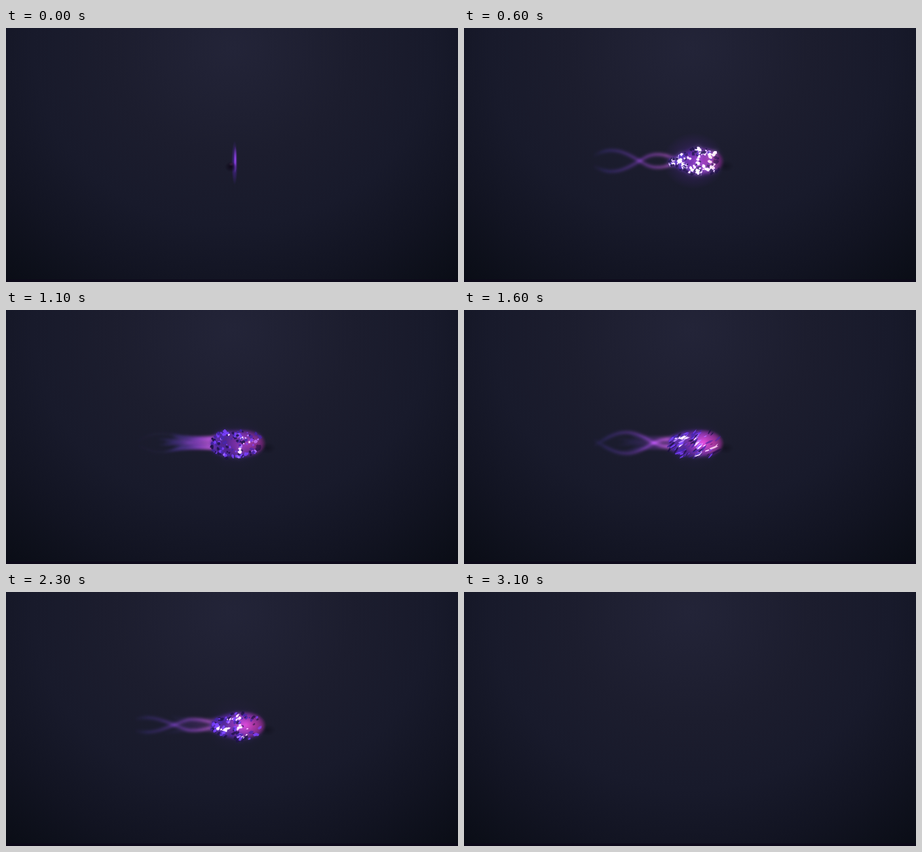
Recreate the animation shown at these times as an HTML page with a canvas. Size 690 by 388 pixels, loop 3500 ms.

```html
<!DOCTYPE html>
<html lang="en">
<head>
<meta charset="utf-8">
<title>Crystal bolt</title>
<style>
html, body { margin: 0; width: 100%; height: 100%; overflow: hidden; background: #10121f; }
canvas { display: block; width: 690px; height: 388px; }
</style>
</head>
<body>
<canvas id="stage" width="690" height="388"></canvas>
<script>
const W = 690, H = 388, LOOP = 3500, STEP = 100;
const MID_Y = 204, BODY_X = 353, HALF_LENGTH = 41;
const ctx = document.getElementById('stage').getContext('2d');

function layer(draw) {
  const canvas = document.createElement('canvas');
  canvas.width = W;
  canvas.height = H;
  if (draw) draw(canvas.getContext('2d'));
  return canvas;
}

const bodyLayer = layer();
const body = bodyLayer.getContext('2d');

const backdrop = layer(g => {
  g.save();
  g.translate(345, 30);
  g.scale(1.12, 1);
  const shade = g.createRadialGradient(0, 0, 0, 0, 0, 470);
  shade.addColorStop(0, 'rgb(35,36,56)');
  shade.addColorStop(.35, 'rgb(28,29,46)');
  shade.addColorStop(.58, 'rgb(24,26,43)');
  shade.addColorStop(.78, 'rgb(18,20,34)');
  shade.addColorStop(1, 'rgb(10,13,22)');
  g.fillStyle = shade;
  g.fillRect(-400, -40, 800, 500);
  g.restore();
  g.fillStyle = 'rgba(14,8,26,.7)';
  g.fillRect(0, 384, W, 4);
});

// step, crossing x, spread, tail, fan, white, pink, halo, streak, left taper
const KEYS = [
  [1, 347, 13, .5, .3, .8, .5, .8, 0, .7],
  [6, 268, 16, .75, 0, 1, .3, .55, 0, 1],
  [11, 194, 14, .08, 1, .35, .45, .1, 0, 0],
  [16, 120, 16, .75, .4, .45, .85, .1, 1, .2],
  [20, 50, 14, .8, .4, .6, .75, .14, .5, .1],
  [27, -63, 7, .55, 0, .42, .8, .1, 0, .9],
  [30, -110, 7, .4, 0, .15, .4, .04, 0, .6]
];

function pose(step) {
  const next = Math.max(1, KEYS.findIndex(k => k[0] >= step));
  const a = KEYS[next - 1], b = KEYS[next];
  const p = (step - a[0]) / (b[0] - a[0]);
  const [, cross, spread, tail, fan, white, pink, halo, streak, taper] =
    a.map((v, i) => v + (b[i] - v) * p);
  return { cross, spread, tail, fan, white, pink, halo, streak, taper };
}

function seeded(seed) {
  let s = seed;
  return () => {
    s = (s + 0x6D2B79F5) | 0;
    let n = Math.imul(s ^ s >>> 15, 1 | s);
    n ^= n + Math.imul(n ^ n >>> 7, 61 | n);
    return ((n ^ n >>> 14) >>> 0) / 4294967296;
  };
}

function glow(g, x, y, rx, ry, rgb, alpha) {
  g.save();
  g.translate(x, y);
  g.scale(rx, ry);
  const fill = g.createRadialGradient(0, 0, 0, 0, 0, 1);
  fill.addColorStop(0, `rgba(${rgb},${alpha})`);
  fill.addColorStop(.5, `rgba(${rgb},${alpha * .5})`);
  fill.addColorStop(1, `rgba(${rgb},0)`);
  g.fillStyle = fill;
  g.fillRect(-1, -1, 2, 2);
  g.restore();
}

function tailColor(left, alpha) {
  const fill = ctx.createLinearGradient(left, 0, 330, 0);
  fill.addColorStop(0, 'rgba(50,30,130,0)');
  fill.addColorStop(.15, `rgba(64,34,150,${alpha * .5})`);
  fill.addColorStop(.55, `rgba(125,42,175,${alpha * .85})`);
  fill.addColorStop(.85, `rgba(185,70,190,${alpha})`);
  fill.addColorStop(1, 'rgba(185,70,190,0)');
  return fill;
}

function drawTail(p) {
  ctx.save();
  ctx.globalCompositeOperation = 'lighter';
  ctx.filter = 'blur(1.4px)';
  for (const side of [-1, 1]) {
    ctx.beginPath();
    for (let x = 196; x <= 328; x += 3) {
      const narrow = Math.min(1, Math.max(.35, (318 - x) / 60 + .35));
      const y = MID_Y - 1 + side * p.spread * narrow * Math.sin(Math.PI * (x - p.cross) / 85);
      ctx.lineTo(x, y);
    }
    for (const [width, alpha] of [[9, .2], [4.5, .25], [2, .2]]) {
      ctx.strokeStyle = tailColor(196, p.tail * alpha);
      ctx.lineWidth = width;
      ctx.stroke();
    }
  }
  const random = seeded(31);
  ctx.lineWidth = 5;
  for (let i = 0; i < 11 && p.fan > 0; i++) {
    const offset = (i - 5) / 5;
    const left = 230 + random() * 28;
    ctx.strokeStyle = tailColor(left, p.fan * .3);
    ctx.beginPath();
    ctx.moveTo(left, MID_Y - 1 + offset * 14);
    ctx.quadraticCurveTo(280, MID_Y - 1 + offset * 6, 332, MID_Y - 1 + offset * 11);
    ctx.stroke();
  }
  ctx.restore();
}

function halfHeight(u, taper) {
  const round = 22 * Math.sqrt(1 - Math.pow(Math.abs(u), 3));
  const cone = 22 * Math.min(1, (u + 1.15) * .95);
  return round + (Math.min(round, cone) - round) * taper;
}

function shardColor(light, white) {
  if (light > 1 - white * .65) return 'rgb(228,208,255)';
  if (light > .78 - white * .3) return 'rgb(150,105,245)';
  if (light > .5 - white * .15) return 'rgb(98,52,205)';
  if (light > .26) return 'rgb(55,30,135)';
  return 'rgb(24,15,56)';
}

function shard(x, y, size, color, stretch, random) {
  body.save();
  body.translate(x, y);
  body.rotate(-1 + random() * .7);
  body.scale(1 + stretch * 1.2, 1 - stretch * .5);
  body.fillStyle = color;
  body.beginPath();
  for (let i = 0; i < 5; i++) {
    const angle = i * Math.PI * .4;
    const radius = size * (.55 + random() * .7);
    body.lineTo(Math.cos(angle) * radius, Math.sin(angle) * radius);
  }
  body.fill();
  body.restore();
}

function drawBody(p, step) {
  body.clearRect(0, 0, W, H);
  body.save();
  body.filter = 'blur(2px)';
  const base = body.createLinearGradient(312, 0, 395, 0);
  base.addColorStop(0, 'rgba(62,30,125,.85)');
  base.addColorStop(.6, 'rgba(78,32,125,.85)');
  base.addColorStop(1, 'rgba(72,24,82,.7)');
  body.fillStyle = base;
  body.beginPath();
  for (const side of [-1, 1]) {
    for (let i = -20; i <= 20; i++) {
      const u = -side * i / 20;
      body.lineTo(BODY_X + u * HALF_LENGTH, MID_Y + side * halfHeight(u, p.taper) * .9);
    }
  }
  body.fill();
  body.restore();
  glow(body, 366, MID_Y - 1, 31, 21, '200,66,185', p.pink);

  // Shards sit on a barrel that turns about the flight axis.
  const random = seeded(7);
  for (let i = 0; i < 330; i++) {
    const u = random() * 1.84 - .94;
    const angle = random() * Math.PI * 2 + step * .14;
    const depth = .55 + random() * .45;
    const size = 1.2 + random() * 2.3;
    const spark = random();
    const keep = random();
    const shape = seeded(i + 90);
    const across = Math.sin(angle) * depth;
    if (Math.cos(angle) < -.15) continue;
    if (keep < p.pink * (u > .35 ? .75 : .4)) continue;
    const light = spark * (1.12 - .45 * (u * u + across * across));
    shard(BODY_X + u * HALF_LENGTH, MID_Y + 1 + across * halfHeight(u, p.taper),
      size, shardColor(light, p.white), p.streak, shape);
  }

  glow(ctx, 399, 211, 13, 9, '8,8,18', .4);
  ctx.drawImage(bodyLayer, 0, 0);
  ctx.save();
  ctx.globalCompositeOperation = 'lighter';
  ctx.globalAlpha = .2 + p.white * .25;
  ctx.filter = 'blur(3px)';
  ctx.drawImage(bodyLayer, 0, 0);
  ctx.restore();
  glow(ctx, 381, MID_Y, 17, 16, '190,45,130', .2 + p.pink * .15);
}

function drawOpening() {
  glow(ctx, 349, 206, 5, 34, '92,40,190', .75);
  glow(ctx, 350, 201, 2.5, 21, '165,75,255', .9);
  glow(ctx, 343, 212, 9, 8, '14,8,24', .95);
  glow(ctx, 344, 208, 4, 3, '85,35,85', .5);
}

function render(step) {
  ctx.drawImage(backdrop, 0, 0);
  if (step === 0) return drawOpening();
  if (step > 30) return;
  const p = pose(step);
  glow(ctx, 351, MID_Y - 1, 48, 43, '105,45,190', p.halo * .7);
  drawTail(p);
  drawBody(p, step);
}

const start = performance.now();
let shown = -1;
function tick() {
  const step = Math.floor((performance.now() - start) % LOOP / STEP);
  if (step !== shown) render(shown = step);
  requestAnimationFrame(tick);
}
tick();
</script>
</body>
</html>
```
